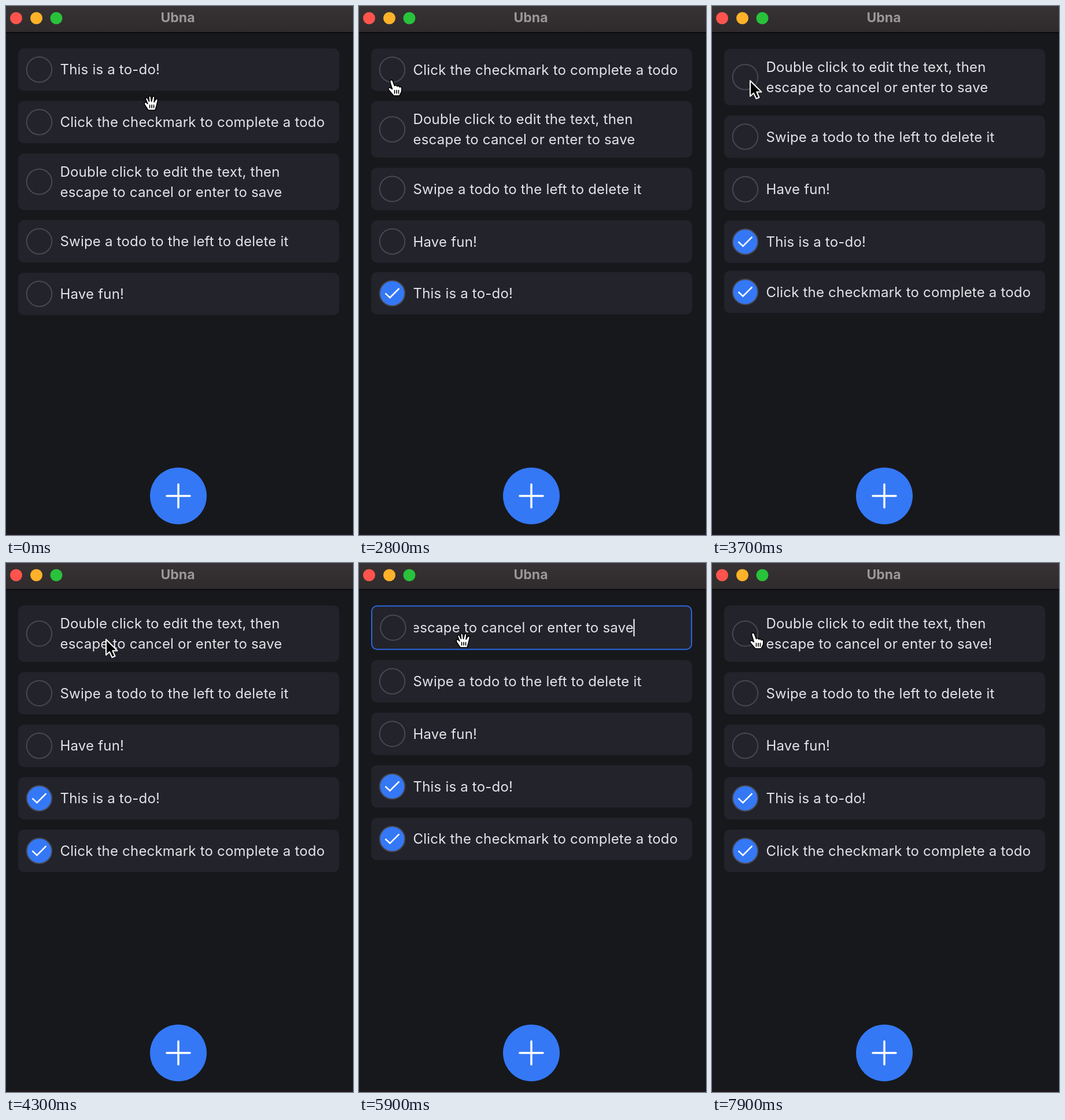
These frames come from a looping animation (600x914 px, 8 s). An HTML page:

```html
<!DOCTYPE html>
<html lang="en">
<head>
<meta charset="utf-8">
<title>To-do list</title>
<style>
  html, body { margin: 0; width: 100%; height: 100%; overflow: hidden; background: #17181c; }
  svg { display: block; }
  text {
    font: 24px Inter, sans-serif;
    font-optical-sizing: none;
    letter-spacing: .2px;
    fill: #e4e4e8;
    white-space: pre;
  }
  .title { font-weight: 700; font-size: 23px; letter-spacing: 0; fill: #9c9798; }
  .card { fill: #23232b; }
  .ring { fill: none; stroke: #484852; stroke-width: 2; }
  .done { fill: #3478f6; }
  .editing { stroke: #2b66dc; stroke-width: 2; }
  .line { fill: none; stroke: #fff; stroke-width: 2.6; }
  .hand { fill: #fff; stroke: #000; stroke-width: 1.6; stroke-linejoin: round; stroke-linecap: round; }
  .arrow { fill: #000; stroke: #fff; stroke-width: 2; stroke-linejoin: round; }
</style>
</head>
<body>
<svg width="600" height="914" viewBox="0 0 600 914">
  <defs>
    <linearGradient id="bar" x2="0" y2="1">
      <stop stop-color="#373233"/><stop offset="1" stop-color="#2f2b2c"/>
    </linearGradient>
    <path id="arrow" class="arrow" d="M0 0V27L6 21.500 10.500 31 15.500 29 11.300 19.500H19.500Z"/>
    <g id="pointer" class="hand">
      <path d="M-2.500 3Q-2-2 2 .5L5.500 10Q8.500 7 10 11 12.500 8.500 14 12 17.500 10.500 18 14.500L17.500 20 14 27H4L-5 16.500Q-6 12.500-1.500 13.500L1.500 15.500Z"/>
      <path d="M5.500 17.500V23M9 17.500V23M12.500 17.500V23"/>
    </g>
    <g id="grab" class="hand">
      <path d="M-5 13L-11 4Q-13 0-9.500-1L-6 2-9.500-6Q-9.500-9.500-6.500-8L-3.500-2-4-10Q-2.500-13-.5-10L.5-2 2.500-10Q4.500-12.500 6-9.500L5-1 8-6Q11-8 11.500-4L9 6 7 13Z"/>
      <path d="M-2.500 4V9M1 4V9M4.500 4V9"/>
    </g>
  </defs>
  <rect width="600" height="914" fill="#17181c"/>
  <rect width="600" height="45" fill="url(#bar)"/>
  <rect y="45" width="600" height="1.500" fill="#060607"/>
  <rect y="912" width="600" height="2" fill="#21171c"/>
  <circle cx="17.500" cy="21" r="10.500" fill="#ff544d"/>
  <circle cx="52.500" cy="21" r="10.500" fill="#ffb229"/>
  <circle cx="87" cy="21" r="10.500" fill="#29c23b"/>
  <text class="title" x="297" y="28" text-anchor="middle">Ubna</text>
  <g id="list"></g>
  <circle class="done" cx="298" cy="846.500" r="49"/>
  <path d="M278 846.500H318M298 826.500V866.500" stroke="#fff" stroke-width="3.500" stroke-linecap="round"/>
  <use id="cursor"/>
</svg>
<script>
const LOOP = 8000, STEP = 100, MOVE = 500;
const CHECKS = [2335, 3262];              // completion times of the first two items
const EDIT = 4800, TYPED = 6500, SAVE = 7000;

const items = [
  ['This is a to-do!'],
  ['Click the checkmark to complete a todo'],
  ['Double click to edit the text, then', 'escape to cancel or enter to save'],
  ['Swipe a todo to the left to delete it'],
  ['Have fun!']
];
const orders = [[0, 1, 2, 3, 4], [1, 2, 3, 4, 0], [2, 3, 4, 0, 1]];

// time, x, y, shape; positions are joined by eased moves
const track = [
  [0, 251, 167, 'grab'], [1300, 251, 167, 'grab'], [1400, 242, 166, 'arrow'],
  [1700, 104, 209, 'arrow'], [2000, 56, 128, 'pointer'], [3600, 56, 128, 'pointer'],
  [3700, 66, 129, 'arrow'], [4100, 173, 132, 'arrow'], [4600, 173, 132, 'arrow'],
  [4700, 180, 133, 'grab'], [7200, 180, 133, 'grab'], [7300, 168, 132, 'arrow'],
  [7600, 71, 121, 'pointer'], [LOOP, 71, 121, 'pointer']
];

const list = document.getElementById('list');
const cursor = document.getElementById('cursor');
const clamp = v => Math.max(0, Math.min(1, v));
const mix = (a, b, p) => a + (b - a) * p;
const bezier = (a, b, u) => 3 * a * u * (1 - u) ** 2 + 3 * b * u * u * (1 - u) + u ** 3;

// The CSS "ease" curve
function ease(x) {
  let lo = 0, hi = 1;
  for (let i = 0; i < 20; i++) {
    const mid = (lo + hi) / 2;
    if (bezier(.25, .25, mid) < x) lo = mid; else hi = mid;
  }
  return bezier(.1, 1, lo);
}

function heightOf(i, editing) {
  if (i !== 2) return 73.2;
  return editing ? 77 : 97.6;
}

function layout(order, editing) {
  const tops = [];
  let y = 73.2;
  for (const i of order) {
    tops[i] = y;
    y += heightOf(i, editing) + 17.6;
  }
  return tops;
}

function circle(x, y, i, t) {
  const age = i < 2 ? t - CHECKS[i] : -1;
  let out = '';
  if (age >= 0) {
    const drawn = clamp((age - 120) / 280);
    out = `<circle class="done" cx="${x}" cy="${y}" r="22"/>`;
    if (drawn) out += `<path class="line" pathLength="1" stroke-dasharray="${drawn} 2"
      d="M${x + 12} ${y - 8.5}L${x - 4} ${y + 7.5} ${x - 12} ${y}"/>`;
  }
  return out + `<circle class="ring" cx="${x}" cy="${y}" r="21.8"/>`;
}

function card(i, y, t, editing) {
  const h = heightOf(i, editing), mid = h / 2;
  const lines = items[i].slice();
  if (i === 2 && t >= TYPED) lines[1] += '!';
  let body;
  if (i === 2 && editing) {
    const caret = (t - EDIT) % 1000 < 500 ? `<path d="M380.500 ${mid - 15}v30" stroke="#fff" stroke-width="2"/>` : '';
    body = `<rect class="card editing" x="22" y="1" width="553" height="${h - 2}" rx="9"/>
      ${circle(59, mid, i, t)}
      <svg x="95" width="382" height="${h}" overflow="hidden">
        <text x="380" y="${mid + 8.7}" text-anchor="end">${lines.join(' ')}</text>${caret}
      </svg>`;
  } else {
    const first = mid + 8.7 - (lines.length - 1) * 17.5;
    body = `<rect class="card" x="21" width="555" height="${h}" rx="10"/>${circle(57.5, mid, i, t)}` +
      lines.map((s, n) => `<text x="93.500" y="${first + n * 35}">${s}</text>`).join('');
  }
  return `<g transform="translate(0 ${y})">${body}</g>`;
}

function drawCursor(t) {
  const n = track.findIndex((k, i) => t >= k[0] && t < track[i + 1][0]);
  const a = track[n], b = track[n + 1];
  const p = (t - a[0]) / (b[0] - a[0]);
  cursor.setAttribute('href', '#' + a[3]);
  cursor.setAttribute('transform', `translate(${mix(a[1], b[1], p)} ${mix(a[2], b[2], p)})`);
}

function render(t) {
  const editing = t >= EDIT && t < SAVE;
  const phase = CHECKS.filter(c => t >= c).length;
  const order = orders[phase];
  const to = layout(order, editing);
  const from = phase ? layout(orders[phase - 1], editing) : to;
  const p = phase ? ease(clamp((t - CHECKS[phase - 1]) / MOVE)) : 1;
  list.innerHTML = order.map(i => card(i, mix(from[i], to[i], p), t, editing)).join('');
  drawCursor(t);
}

const start = performance.now();
let last = -1;
function tick() {
  const t = Math.floor((performance.now() - start) % LOOP / STEP) * STEP;
  if (t !== last) render(last = t);
  requestAnimationFrame(tick);
}
tick();
</script>
</body>
</html>
```
